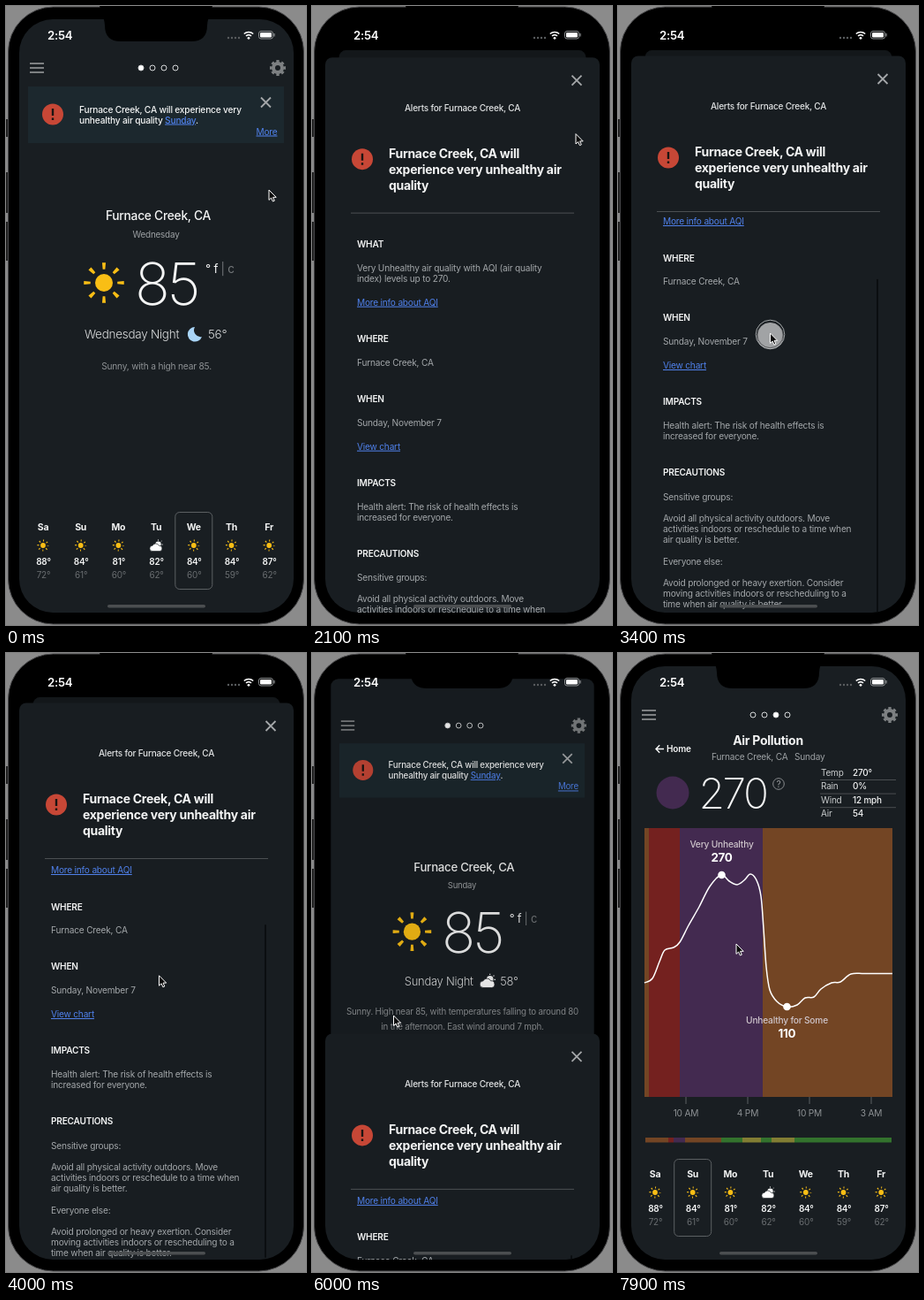
These frames come from a looping animation (340x700 px, 8000 ms). An HTML page:

```html
<!DOCTYPE html>
<html lang="en">
<head>
<meta charset="utf-8">
<title>Weather alert</title>
<style>
  html, body { margin: 0; height: 100%; overflow: hidden; background: #8b8b8b; }
  svg { display: block; }
  text { font-family: Inter, Roboto, sans-serif; letter-spacing: -.02em; white-space: pre; }
</style>
</head>
<body>
<script>
const BG = '#191e22', WHITE = '#f4f5f5', GREY = '#9da1a4', DIM = '#8d9194', LINK = '#4f80ea';
const ORANGE = '#734524', RED = '#74211f', PURPLE = '#432a50', GREEN = '#33722d', OLIVE = '#827d33';

// Drawing helpers
const text = (x, y, str, size = 10.15, fill = WHITE, weight = 400, extra = '') =>
  `<text x="${x}" y="${y}" font-size="${size}" fill="${fill}" font-weight="${weight}" ${extra}>${str}</text>`;
const mid = (x, y, str, size, fill, weight) => text(x, y, str, size, fill, weight, 'text-anchor="middle"');
const link = (x, y, str) => text(x, y, str, 10.15, LINK, 400, 'text-decoration="underline"');
const rect = (x, y, w, h, fill, extra = '') =>
  `<rect x="${x}" y="${y}" width="${w}" height="${h}" fill="${fill}" ${extra}/>`;
const circle = (x, y, r, fill, extra = '') => `<circle cx="${x}" cy="${y}" r="${r}" fill="${fill}" ${extra}/>`;
const line = (d, stroke, width, extra = '') =>
  `<path d="${d}" fill="none" stroke="${stroke}" stroke-width="${width}" ${extra}/>`;
const at = (x, y, k, body) => `<g transform="translate(${x} ${y}) scale(${k})">${body}</g>`;
const group = (id, body) => `<g id="${id}">${body}</g>`;

const spokes = (r, width, fill, duty) => circle(0, 0, r, 'none',
  `stroke="${fill}" stroke-width="${width}" pathLength="8" stroke-dasharray="${duty} ${1 - duty}" stroke-dashoffset="${duty / 2}"`);
const sun = (x, y, k) => at(x, y, k, circle(0, 0, 10, '#f9be15') + spokes(19, 7.5, '#f9be15', .24));
const cloud = (x, y, k) => at(x, y, k, circle(3, -3, 4, WHITE) + spokes.call(0, 0, 0, 'none', .2) +
  line('M3-9.5V-8M8-7.5L7-6.5M9.5-2.5H8', WHITE, 1.2) +
  `<path d="M-5 7A4 4 0 0 1-5-1A5 5 0 0 1 4-1A4 4 0 0 1 5 7Z" fill="#fff" stroke="${BG}" stroke-width=".8"/>`);
const moon = (x, y) => at(x, y, 1,
  '<path d="M0-8A8.3 8.3 0 1 0 8 3A7.5 7.5 0 0 1 0-8Z" fill="#a9d5f8"/>');
const cross = (x, y) => line(`M${x - 5.5} ${y - 5.5}l11 11m0-11l-11 11`, '#a4a7a9', 1.8);
const alertIcon = (x, y) => circle(x, y, 12, '#c74736') +
  line(`M${x} ${y - 6.5}v8m0 2.5v2.6`, '#1a1512', 2.4);
const dots = active => [0, 1, 2, 3].map(i =>
  circle(153 + 13 * i, 70, 3, i === active ? '#fff' : 'none', 'stroke="#d8dadb"')).join('');

// Smooth path through a flat list of x, y values
function curve(v) {
  const p = [];
  for (let i = 0; i < v.length; i += 2) p.push([v[i], v[i + 1]]);
  return p.slice(1).reduce((d, b, i) => {
    const a = p[i], before = p[i - 1] || a, after = p[i + 2] || b;
    return d + `C${a[0] + (b[0] - before[0]) / 6} ${a[1] + (b[1] - before[1]) / 6} ` +
      `${b[0] - (after[0] - a[0]) / 6} ${b[1] - (after[1] - a[1]) / 6} ${b[0]} ${b[1]}`;
  }, `M${p[0]}`);
}

const bands = (y, h, stops, colours) => colours.map((c, i) =>
  rect(stops[i], y, stops[i + 1] - stops[i], h, c)).join('');

// Screens
const days = [['Sa', 88, 72], ['Su', 84, 61], ['Mo', 81, 60], ['Tu', 82, 62], ['We', 84, 60], ['Th', 84, 59], ['Fr', 87, 62]];
const dayX = i => 42 + 42.7 * i;
const week = days.map(([name, high, low], i) => {
  const x = dayX(i);
  return mid(x, 592.5, name, 10.5, WHITE, 700) + (i === 3 ? cloud(x, 611, .8) : sun(x, 610, .29)) +
    mid(x + .5, 632, high + '°', 10, WHITE, 600) + mid(x + .5, 647, low + '°', 10, '#696d70');
}).join('');
const selected = i => rect(dayX(i) - 21, 572.5, 42, 87, 'none', 'rx="5" stroke="#5c6063"');

const chrome = line('M27 65h16m-16 5h16m-16 5h16', '#7d8082', 1.8) +
  at(308, 70, 1, circle(0, 0, 5, 'none', 'stroke="#7d8082" stroke-width="4"') + spokes(7.6, 2.8, '#7d8082', .55)) + week;

const banner = rect(25, 91, 290, 64, '#1c282e') + alertIcon(53, 122.5) +
  text(83, 120.5, 'Furnace Creek, CA will experience very', 10.2, WHITE, 500) +
  text(83, 132.5, `unhealthy air quality <tspan fill="${LINK}" text-decoration="underline">Sunday</tspan>.`, 10.2, WHITE, 500) +
  cross(294.5, 109) + link(283.5, 145.5, 'More');

const home = dots(0) + banner + mid(172.5, 242, 'Furnace Creek, CA', 13.8, WHITE, 500) + sun(111, 313, 1) +
  text(182, 338, '85', 66, WHITE, 200, 'text-anchor="middle" style="letter-spacing:-.04em"') +
  text(226, 302, '° f', 13.5) + text(243.5, 302, '| c', 13.5, '#74787b') +
  group('wednesday', mid(170, 262, 'Wednesday', 9.9, GREY) + text(89, 376, 'Wednesday Night', 13.5, '#dcdedf', 300) +
    moon(214, 371) + text(229, 376, '56°', 13.5, '#dcdedf', 300) +
    mid(170.5, 410.5, 'Sunny, with a high near 85.', 10.2, DIM) + selected(4)) +
  group('sunday', mid(170, 262, 'Sunday', 9.9, GREY) + text(102, 376, 'Sunday Night', 13.5, '#dcdedf', 300) +
    cloud(200, 372, 1) + text(215, 376, '58°', 13.5, '#dcdedf', 300) +
    mid(170.5, 411, 'Sunny. High near 85, with temperatures falling to around 80', 10.2, DIM) +
    mid(170.5, 428.5, 'in the afternoon. East wind around 7 mph.', 10.2, DIM) + selected(1));

const readings = [['Temp', '270°'], ['Rain', '0%'], ['Wind', '12 mph'], ['Air', '54']].map(([label, value], i) => {
  const y = 138.5 + 15.6 * i;
  return text(230, y, label, 10, '#c9cccd') + text(266, y, value, 10, WHITE, 500) +
    (i < 3 ? line(`M229 ${y + 5}h86`, '#4a4e51', 1) : '');
}).join('');

const peak = (x, y, name, value, textY) => circle(x, y, 4.3, '#fff') +
  mid(x, textY, name, 10.2, '#cfc6cc', 500) + mid(x, textY + 15.5, value, 13.4, '#fff', 700);

const air = dots(2) + line('M52 108.5h-9m4.2-4.2l-4.2 4.2l4.2 4.2', WHITE, 1.4) + text(55, 112, 'Home', 10, WHITE, 600) +
  mid(170, 104, 'Air Pollution', 14, WHITE, 700) +
  text(106, 120.5, 'Furnace Creek, CA', 10.1, GREY) + text(200, 120.5, 'Sunday', 10.1, GREY) +
  circle(62, 158, 18.5, PURPLE) +
  text(130, 175.5, '270', 48, WHITE, 200, 'text-anchor="middle" style="letter-spacing:-.05em"') +
  circle(182, 148, 6.3, 'none', 'stroke="#8a8d90"') + mid(182, 151.7, '?', 10, '#8a8d90', 500) + readings +
  bands(198, 304, [30, 35, 70, 164, 311], [ORANGE, RED, PURPLE, ORANGE]) +
  line(curve([30, 373, 39, 368, 47, 349, 53, 336, 63, 333, 70, 327, 80, 308, 92, 287, 104, 264, 117, 251,
    126, 258, 135, 262, 143, 257, 150, 250, 157, 257, 162, 275, 165, 312, 168, 355, 172, 381, 180, 394, 191, 400,
    203, 398, 212, 390, 222, 389, 230, 380, 242, 373, 252, 372, 264, 363, 280, 362.5, 311, 362.5]), '#fff', 1.5) +
  peak(117.5, 251, 'Very Unhealthy', '270', 220) + peak(191.5, 400, 'Unhealthy for Some', '110', 419) +
  ['10 AM', '4 PM', '10 PM', '3 AM'].map((hour, i) =>
    line(`M${77 + 70 * i} 502v8`, '#5c6063', 1) + mid(77 + 70 * i, 523.5, hour, 10.2, DIM)).join('') +
  bands(548, 5.5, [31, 57, 63, 76, 117, 141, 162, 174, 200, 310],
    [ORANGE, RED, PURPLE, ORANGE, GREEN, OLIVE, GREEN, OLIVE, GREEN]) + selected(1);

const heading = (y, str) => text(51, y, str, 10.1, WHITE, 600);
const body = (y, ...rows) => rows.map((row, i) => text(51, y + 12.3 * i, row, 10.15, '#a3a7aa')).join('');
const details =
  heading(271, 'WHAT') + body(298, 'Very Unhealthy air quality with AQI (air quality', 'index) levels up to 270.') +
  link(51, 337, 'More info about AQI') +
  heading(378.5, 'WHERE') + body(405, 'Furnace Creek, CA') +
  heading(446, 'WHEN') + body(473, 'Sunday, November 7') + link(51, 500, 'View chart') +
  heading(541, 'IMPACTS') + body(568, 'Health alert: The risk of health effects is', 'increased for everyone.') +
  heading(621, 'PRECAUTIONS') + body(648.5, 'Sensitive groups:') +
  body(672.5, 'Avoid all physical activity outdoors. Move', 'activities indoors or reschedule to a time when', 'air quality is better.') +
  body(721.5, 'Everyone else:') +
  body(745.5, 'Avoid prolonged or heavy exertion. Consider', 'moving activities indoors or rescheduling to a', 'time when air quality is better.');

const sheet = rect(15, 56.5, 311, 660, '#181d21', 'rx="8"') + cross(300, 82.5) +
  mid(170.5, 117, 'Alerts for Furnace Creek, CA', 10, '#e2e4e5', 500) + alertIcon(57, 171.5) +
  ['Furnace Creek, CA will', 'experience very unhealthy air', 'quality'].map((row, i) =>
    text(87, 170.3 + 18 * i, row, 14, WHITE, 700)).join('') +
  line('M44 232.5h253', '#4b4f52', 1) +
  `<svg x="0" y="233" width="340" height="467" viewBox="0 233 340 467">${group('details', details)}
   ${rect(293, 232, 2, 377, '#0b0e10', 'id="bar" rx="1"')}</svg>`;

const status = `<path d="M106 0Q112 16 112 22Q112 40 130 40H210Q228 40 228 22Q228 16 234 0Z"/>` +
  text(47, 37.5, '2:54', 13.2, '#fff', 600) +
  [252, 256, 260, 264].map(x => circle(x, 36, 1.2, '#5b5e60')).join('') +
  line('M269.8 31.5a7.6 7.6 0 0 1 10.4 0M272 33.9a4.5 4.5 0 0 1 6 0', '#fff', 1.6) + circle(275, 36.3, 1.4, '#fff') +
  rect(286.5, 28.5, 16, 8.5, 'none', 'rx="2.5" stroke="#8b8e90"') + rect(288, 30, 13, 5.5, '#fff', 'rx="1.2"') +
  rect(303.5, 31, 1.2, 3.5, '#8b8e90') +
  rect(115, 677, 111, 3.6, '#4b4e50', 'rx="1.8"');

document.body.innerHTML = `<svg width="340" height="700" viewBox="0 0 340 700">
  <clipPath id="screen"><rect x="15" y="15" width="311" height="671" rx="38"/></clipPath>
  ${rect(0, 128, 4, 20, '#222')}${rect(0, 188, 4, 46, '#222')}${rect(0, 244, 4, 44, '#222')}
  ${rect(2.5, 1, 335, 698, '#000', 'rx="51" stroke="#4b4b4d"')}
  <g clip-path="url(#screen)">
    ${group('card', rect(15, 15, 311, 671, BG, 'rx="9"') + chrome + group('home', home) + group('air', air) +
      rect(15, 15, 311, 671, '#000', 'id="shade" rx="9"'))}
    ${group('sheet', sheet)}
  </g>
  ${status}
  ${group('touch', circle(0, 0, 15, '#b4b6b7', 'fill-opacity=".88"') +
    circle(0, -1.5, 16.3, 'none', 'stroke="#c6c8c9" stroke-width=".8"') + circle(0, -1, 14.6, 'none', 'stroke="#2a2d2f" stroke-width=".6"'))}
  <path id="cursor" d="M0 0V11.4L2.6 9L4.4 13L6.3 12.2L4.6 8.3H8.2Z" fill="#0b0b0b" stroke="#fff" stroke-width="1"/>
</svg>`;

// Motion
const el = id => document.getElementById(id);
const ramp = (t, from, to) => {
  const u = Math.min(1, Math.max(0, (t - from) / (to - from)));
  return u * u * (3 - 2 * u);
};
// Critically damped spring from 0 to 1
const spring = (t, start) => {
  const x = Math.max(0, t - start) * .018;
  return 1 - (1 + x) * Math.exp(-x);
};
const within = (t, from, to) => t >= from && t < to;
const path = [[100, 298, 208], [1200, 299, 145], [2450, 299, 144.5], [2900, 172.5, 460], [3300, 172.5, 370],
  [3550, 172.5, 370], [4300, 174, 362], [4450, 174, 362], [5150, 92.5, 410], [7600, 92.5, 410], [7900, 134, 329]];

function pointer(t) {
  let [, x, y] = path[0];
  for (let i = 1; i < path.length; i++) {
    const k = ramp(t, path[i - 1][0], path[i][0]);
    x += (path[i][1] - path[i - 1][1]) * k;
    y += (path[i][2] - path[i - 1][2]) * k;
  }
  return [x, y];
}

function draw(t) {
  const open = spring(t, 1647) - spring(t, 5890);
  const scroll = 90 * ramp(t, 2900, 3300) - 2 * ramp(t, 3500, 3800);
  const [x, y] = pointer(t);
  const set = (id, name, value) => el(id).setAttribute(name, value);

  set('card', 'transform', `translate(170.5 366) scale(${1 - .1 * open}) translate(-170.5 -366)`);
  set('shade', 'opacity', .25 * open);
  set('sheet', 'transform', `translate(0 ${630 * (1 - open)})`);
  set('details', 'transform', `translate(0 ${-scroll})`);
  set('bar', 'transform', `translate(0 ${75 * scroll / 88})`);
  set('bar', 'opacity', ramp(t, 2900, 3050));

  set('wednesday', 'display', t < 5400 ? 'inline' : 'none');
  set('sunday', 'display', t < 5400 ? 'none' : 'inline');
  set('home', 'opacity', 1 - ramp(t, 6400, 6580));
  set('air', 'opacity', ramp(t, 6500, 6900));

  const pressed = within(t, 1400, 1560) || within(t, 2880, 3500) || within(t, 5220, 5400);
  set('touch', 'display', pressed ? 'inline' : 'none');
  set('touch', 'transform', `translate(${x} ${y + 3})`);
  set('cursor', 'transform', `translate(${x} ${y})`);
}

const start = performance.now();
function tick() {
  draw((performance.now() - start) % 8000);
  requestAnimationFrame(tick);
}
tick();
</script>
</body>
</html>
```
